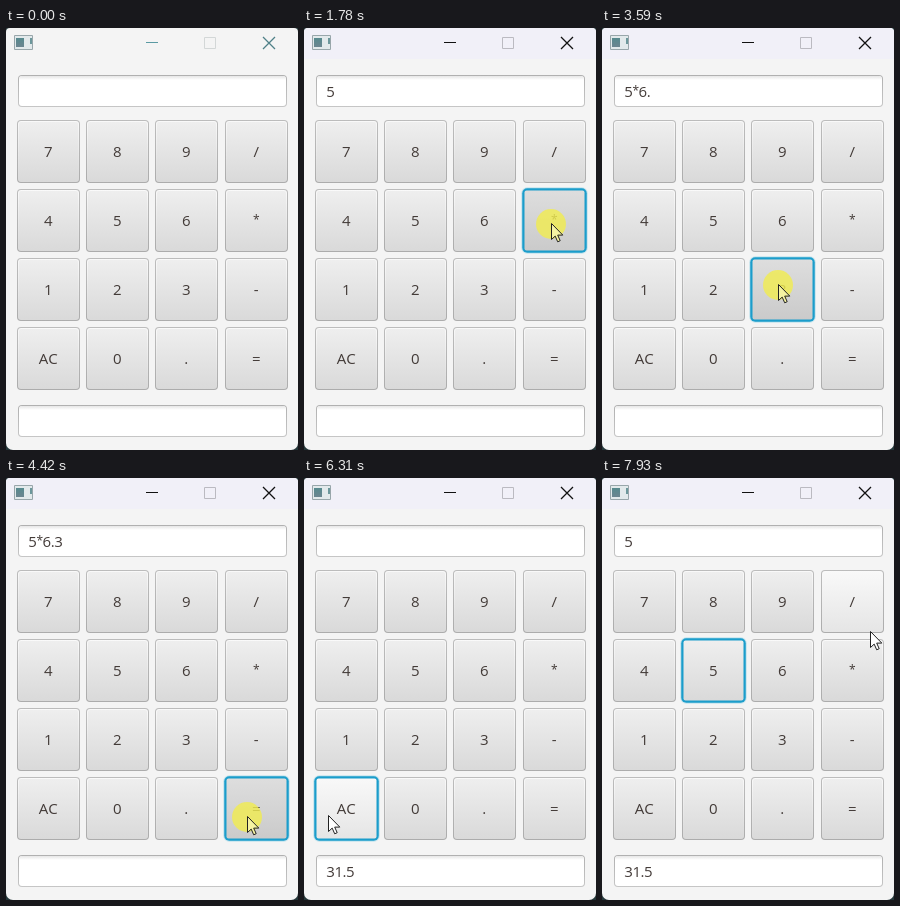
Animation, 292 px wide and 422 px high, one loop 8 s. Source, as an HTML page with a canvas:

```html
<!DOCTYPE html>
<html lang="en">
<head>
<meta charset="utf-8">
<title>Calculator</title>
<style>
html, body { margin: 0; width: 100%; height: 100%; overflow: hidden; background: #26383b; }
canvas { display: block; }
</style>
</head>
<body>
<canvas id="stage" width="292" height="422"></canvas>
<script>
const ctx = document.getElementById('stage').getContext('2d');
const LOOP = 8000, STEP = 70, TRAVEL = 560, SIZE = 63;
const BUTTONS = '7 8 9 / 4 5 6 * 1 2 3 - AC 0 . ='.split(' ').map((label, i) => ({
  label,
  x: Math.floor(11.2 + 69.27 * (i % 4)),
  y: 92 + 69 * Math.floor(i / 4)
}));
const ARROW = new Path2D('M0 0V16L3.7 12.6L6.2 18.3L8.7 17.2L6.2 11.6H11.3Z');

// The pointer sets off at go, heads for (x, y) and presses the key there.
const ENTRY = { x: 192, y: 362 };
const ACTIONS = [
  { go: 260, press: 1080, key: '5', x: 116, y: 191 },
  { go: 1150, press: 1780, key: '*', x: 247, y: 195 },
  { go: 1850, press: 2340, key: '6', x: 187, y: 199 },
  { go: 2540, press: 3310, key: '.', x: 178, y: 333 },
  { go: 3380, press: 3590, key: '3', x: 176, y: 256 },
  { go: 3660, press: 4420, key: '=', x: 241, y: 338 },
  { go: 5680, press: 6240, key: 'AC', x: 24, y: 337 },
  { go: 6700, press: 7450, key: '5', x: 126, y: 203 },
  { go: 7600, press: 7930, x: 268, y: 153 }
];
const APPEAR = ACTIONS[0].go, ACTIVATE = ACTIONS[0].press;

// The pointer is sampled every STEP ms.
function pointerAt(t) {
  let { x, y } = ENTRY;
  for (const a of ACTIONS) {
    if (t < a.go) break;
    const duration = Math.min(TRAVEL, a.press - a.go);
    const p = t >= a.go + duration ? 1 : Math.floor((t - a.go) / STEP) * STEP / duration;
    const eased = p * p * (3 - 2 * p);
    x += (a.x - x) * eased;
    y += (a.y - y) * eased;
  }
  return { x: Math.round(x), y: Math.round(y) };
}

function calculatorAt(t) {
  const state = { input: '', result: '', focus: '', pressed: false };
  for (const { press, key } of ACTIONS) {
    if (!key || t < press) break;
    state.focus = key;
    state.pressed = t < press + STEP;
    if (state.pressed) break;
    if (key === 'AC') state.input = '';
    else if (key === '=') state.result = String(state.input.split('*').reduce((a, b) => a * b));
    else state.input += key;
  }
  return state;
}

function box(x, y, w, h, r, fill) {
  ctx.fillStyle = fill;
  ctx.beginPath();
  ctx.roundRect(x, y, w, h, r);
  ctx.fill();
}

function inset(x, y, w, h, d, r, fill) {
  box(x + d, y + d, w - 2 * d, h - 2 * d, r, fill);
}

function shade(y, h, top, bottom) {
  const g = ctx.createLinearGradient(0, y, 0, y + h);
  g.addColorStop(0, top);
  g.addColorStop(1, bottom);
  return g;
}

function stroke(path, color, width = 1) {
  ctx.strokeStyle = color;
  ctx.lineWidth = width;
  ctx.stroke(new Path2D(path));
}

// The asterisk is set smaller and raised.
function text(string, x, y, centered) {
  ctx.letterSpacing = centered ? '0px' : '-0.45px';
  const measure = c => {
    ctx.font = `${c === '*' ? 12 : 15}px "Open Sans", "Noto Sans", sans-serif`;
    return ctx.measureText(c).width;
  };
  const chars = [...string];
  if (centered) x -= chars.reduce((sum, c) => sum + measure(c), 0) / 2;
  ctx.fillStyle = '#433b38';
  for (const c of chars) {
    const width = measure(c);
    ctx.fillText(c, x, c === '*' ? y - 2 : y);
    x += width;
  }
}

function drawWindow(t) {
  const awake = t >= ACTIVATE, active = t >= ACTIVATE + STEP;
  box(0, 0, 292, 422, [4, 4, 7, 7], '#f4f4f4');
  if (active) box(0, 0, 292, 31, [4, 4, 0, 0], '#f1f0f8');

  box(8, 7, 19, 15, 1, '#98a6aa');
  box(9, 8, 17, 13, 0, '#e2e9eb');
  box(10, 10, 8, 9, 0, shade(10, 9, '#568a8e', '#6c8590'));
  box(24, 10, 2, 6, 0, '#6c979b');

  stroke('M140 14.5H152', awake ? '#111' : '#5b9aa3');
  stroke('M198.5 9.5h11v11h-11z', active ? '#bbbac1' : awake ? '#a9bdbf' : '#d3d7d7');
  stroke('M257 9L269 21M269 9L257 21', awake ? '#111' : '#4f8088', 1.3);
}

function drawField(y, value) {
  box(12, y, 269, 32, 4, shade(y, 32, '#b0b0b0', '#c6c6c6'));
  inset(12, y, 269, 32, 1, 3, '#fff');
  box(13, y + 1, 267, 4, [3, 3, 0, 0], shade(y + 1, 4, '#e6e6e6', '#fff'));
  text(value, 22.3, y + 22);
}

function drawButton({ label, x, y }, focused, hovered, pressed) {
  const [top, bottom] = pressed ? ['#dedede', '#cacaca'] : hovered ? ['#f9f9f9', '#e5e5e5'] : ['#efefef', '#d9d9d9'];
  const layer = (d, r, fill) => inset(x, y, SIZE, SIZE, d, r, fill);
  if (focused) {
    layer(-1.75, 6, 'rgba(3,158,211,.2)');
    layer(-.75, 5, '#1b9dcb');
  } else {
    layer(0, 4, shade(y, SIZE, '#bcbcbc', '#acacac'));
    layer(1, 3, shade(y, SIZE, '#fafafa', bottom));
  }
  layer(focused ? 1.5 : 2, 2, shade(y, SIZE, top, bottom));
  text(label, x + 31.2, y + 37, true);
}

function drawPointer({ x, y }, pressed) {
  if (pressed) box(x - 15, y - 14, 30, 30, 15, 'rgba(240,236,80,.82)');
  ctx.save();
  ctx.translate(x + .5, y + .5);
  ctx.fillStyle = pressed ? '#f5f3a2' : '#fff';
  ctx.fill(ARROW);
  stroke(ARROW, '#222');
  ctx.restore();
}

function draw(t) {
  const { input, result, focus, pressed } = calculatorAt(t);
  const pointer = pointerAt(t), visible = t >= APPEAR;
  const within = (p, start) => p >= start && p < start + SIZE;
  ctx.clearRect(0, 0, 292, 422);
  drawWindow(t);
  drawField(47, input);
  drawField(377, result);
  for (const b of BUTTONS) {
    const focused = b.label === focus;
    const hovered = visible && within(pointer.x, b.x) && within(pointer.y, b.y);
    drawButton(b, focused, hovered, focused && pressed);
  }
  if (visible) drawPointer(pointer, pressed);
}

const began = performance.now();
function tick() {
  draw((performance.now() - began) % LOOP);
  requestAnimationFrame(tick);
}
tick();
</script>
</body>
</html>
```
